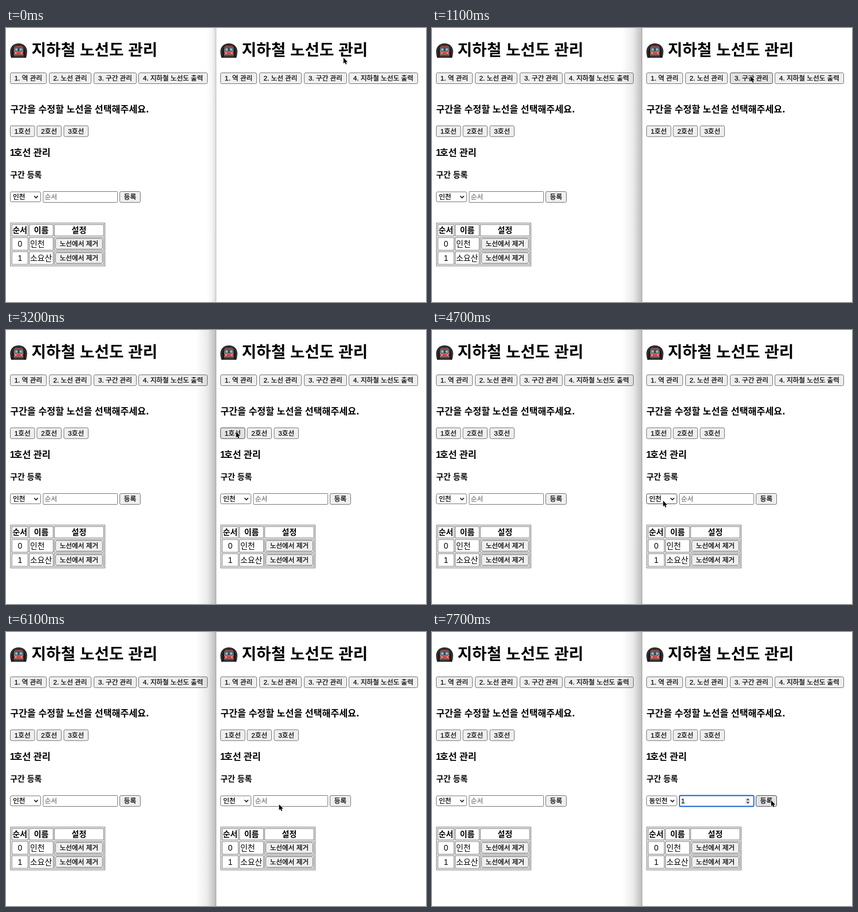
An HTML page for the animation above (8000 ms loop, 733 by 480 pixels).

```html
<!DOCTYPE html>
<html lang="ko">
<head>
<meta charset="utf-8">
<title>지하철 노선도 관리</title>
<style>
  html, body { margin: 0; width: 100%; height: 100%; overflow: hidden; background: #fff; }
  svg { display: block; width: 733px; height: 480px; }
  text { font-family: "Noto Sans CJK KR", "Noto Sans CJK", sans-serif; white-space: pre; }
  .ui, .digit { font-family: "Liberation Sans", "Noto Sans CJK KR", "Noto Sans CJK", sans-serif; }
  .ui { font-size: 11.65px; }
  .ui, .item { fill: currentColor; stroke: currentColor; stroke-width: .25px; }
  .bold { font-weight: 700; }
  .h1 { font-size: 27.75px; }
  .h3 { font-size: 16.2px; }
  .cell { font-size: 13.9px; }
  .item { font-size: 11.1px; }
  .line { fill: none; stroke: #757575; }
</style>
</head>
<body>
<svg id="stage" viewBox="0 0 733 480" xmlns="http://www.w3.org/2000/svg"></svg>
<script>
const LOOP = 8000, STEP = 100, SPLIT = 367;

const label = (x, y, s, cls, extra = '') => `<text x="${x}" y="${y}" class="${cls}" ${extra}>${s}</text>`;
const box = (x, y, w, h, extra) => `<rect x="${x}" y="${y}" width="${w}" height="${h}" ${extra}/>`;
const middle = 'text-anchor="middle"';

function button(x, y, w, h, s, name = '') {
  const id = name && `id="${name}"`;
  return box(x, y, w, h, `rx="2.4" fill="#efefef" stroke="#767676" ${id}`) +
    label(x + w / 2, y + h / 2 + 3.8, s, 'ui', middle);
}

function train() {
  return `<path d="M9 52.3Q7.2 47 7.2 41.5C7.2 32.5 13.5 27 22 27S36.8 32.5 36.8 41.5Q36.8 47 35 52.3Z" fill="#1d1d1f"/>
    <path d="M9.3 48.5C7.5 36 13 28.8 22 28.8S36.5 36 34.7 48.5" fill="none" stroke="#4c4c4f" stroke-width=".9"/>
    <path d="M12 52L15 47H29L32 52Z" fill="#34302f"/>
    <path d="M14 47V36Q14 31.6 18 31.2H26Q30 31.6 30 36V47Q30 48.5 28.5 48.5H15.5Q14 48.5 14 47Z" fill="#a8a5a5"/>
    <path d="M14 37Q14 31.6 18 31.2H26Q30 31.6 30 37L28.8 34.4H15.2Z" fill="#8f4441"/>
    <rect x="15" y="34.6" width="14" height="6.4" rx="1" fill="#2f4049"/>
    <path d="M16 35.6H20.4V40H16ZM23.6 35.6H28V40H23.6Z" fill="#8fb3c2"/>
    <path d="M14 42H30V46H14Z" fill="#d8423e"/>
    <circle cx="17" cy="44" r="1.1" fill="#ffeec0"/><circle cx="27" cy="44" r="1.1" fill="#ffeec0"/>
    <path d="M15 46.5H29V49H15Z" fill="#505053"/>`;
}

function header(p) {
  return train() + label(44.6, 48, '지하철 노선도 관리', 'h1 bold') +
    button(7.5, 78.5, 63, 19, '1. 역 관리') +
    button(75.5, 78.5, 73, 19, '2. 노선 관리') +
    button(153.5, 78.5, 74, 19, '3. 구간 관리', p + 'Section') +
    button(231.5, 78.5, 120, 19, '4. 지하철 노선도 출력');
}

function lines(p) {
  return label(7.2, 148.2, '구간을 수정할 노선을 선택해주세요.', 'h3 bold') +
    button(7.5, 171.3, 42.5, 19, '1호선', p + 'Line') +
    button(54, 171.3, 42.5, 19, '2호선') +
    button(101, 171.3, 42.5, 19, '3호선');
}

function table() {
  const cols = [[10.2, 28.2], [40.6, 41.8], [84.4, 86]];
  const rows = [[344.3, 20], [367, 22.3], [391.8, 22.3]];
  let out = box(7.8, 341.8, 164.8, 75, 'class="line"');
  for (const [y, h] of rows) for (const [x, w] of cols) out += box(x, y, w, h, 'class="line"');
  ['순서', '이름', '설정'].forEach((s, i) =>
    out += label(cols[i][0] + cols[i][1] / 2, 359.4, s, 'cell bold', middle));
  ['인천', '소요산'].forEach((s, i) => {
    const y = 383.2 + i * 24.8;
    out += label(24.4, y, i, 'cell digit', middle) + label(42, y, s, 'cell') +
      button(86.4, 368.8 + i * 24.8, 82, 18.6, '노선에서 제거');
  });
  return out;
}

function form(p) {
  return label(6.7, 223.7, '1', 'h3 bold digit') + label(13.5, 223.7, '호선 관리', 'h3 bold') +
    label(7.2, 261.5, '구간 등록', 'cell bold') +
    box(7.5, 287, 53, 17.5, `rx="2.4" fill="#fff" stroke="#767676" id="${p}Select"`) +
    label(12, 300.1, '인천', 'ui', `id="${p}Station"`) +
    '<path d="M49.3 294.2L52.5 297.6L55.7 294.2" fill="none" stroke="#111" stroke-width="1.6"/>' +
    box(64.9, 286.5, 129.8, 19, `rx="1" fill="#fff" stroke="#767676" id="${p}Input"`) +
    label(67.7, 300.1, '순서', 'ui', `id="${p}Order" color="#757575"`) +
    `<g id="${p}Spin" display="none">${box(179.5, 289.5, 9.5, 13.5, 'rx="1" fill="#ececec"')}
      <path d="M181.3 294.8L184.2 291.4L187.1 294.8ZM181.3 297.6L184.2 301L187.1 297.6Z" fill="#444"/></g>` +
    button(198.5, 286.5, 36, 19, '등록', p + 'Add') + table();
}

const stations = ['인천', '동인천', '도원', '소요산', '사당', '시청', '신도림', '대화', '오금', '오이도'];

function menu() {
  return box(368, 284, 61.5, 220, 'rx="5" fill="#e3e4e6" stroke="#bcbdbf" stroke-width=".7" filter="url(#soft)"') +
    box(372.5, 0, 53, 19, 'rx="3.6" fill="#4290f8" id="mark"') +
    '<path id="check" d="M376.2 297L378.4 299.8L382.6 292.8" fill="none" stroke-width="1.4"/>' +
    stations.map((s, i) => label(386, 300.6 + i * 19.2, s, 'item', `id="item${i}"`)).join('');
}

const shade = (id, from, a, b) => `<linearGradient id="${id}" gradientUnits="userSpaceOnUse" x1="${from}" x2="${SPLIT}" y1="0" y2="0">
  <stop offset="0" stop-opacity="0"/><stop offset=".55" stop-opacity="${a}"/><stop offset="1" stop-opacity="${b}"/></linearGradient>`;

document.getElementById('stage').innerHTML = `
  <defs>${shade('dim', 350, .04, .15)}${shade('deep', 332, .08, .27)}
    <filter id="soft" x="-20%" y="-10%" width="140%" height="120%">
      <feDropShadow dx="0" dy="1.5" stdDeviation="2.2" flood-opacity=".32"/></filter></defs>
  ${box(0, 0, 733, 480, 'fill="#fff"')}
  ${header('l')}${lines('l')}${form('l')}
  ${box(325, 0, SPLIT - 325, 480, 'id="shadow"')}
  ${box(SPLIT, 0, 366, 480, 'fill="#fff"')}
  ${box(SPLIT - 1, 0, 1, 480, 'fill-opacity=".13"')}
  <g transform="translate(${SPLIT})">${header('r')}
    <g id="lines">${lines('r')}</g><g id="form">${form('r')}</g></g>
  <g id="menu">${menu()}</g>
  <path id="cursor" d="M0 0V10.2L2.3 8.1L3.9 11.7L5.7 10.9L4.1 7.4H7.3Z" fill="#000" stroke="#fff" stroke-width="1.3" paint-order="stroke"/>`;

const el = id => document.getElementById(id);
const set = (id, attrs) => { for (const k in attrs) el(id).setAttribute(k, attrs[k]); };
const show = (id, on) => set(id, { display: on ? 'inline' : 'none' });

// time, x, y of the pointer tip
const path = [
  [0, 589, 52], [300, 559, 83], [500, 559, 83], [800, 555.8, 84],
  [1400, 555.8, 84], [2200, 401.5, 178.3], [3500, 401.5, 178.3], [4400, 403, 274],
  [4700, 403.3, 299], [5100, 403.3, 299], [5400, 406.5, 307], [5700, 407, 309],
  [6000, 466, 303], [6100, 476.5, 302], [6500, 476.5, 302], [7200, 591, 296],
  [7300, 591, 296], [7700, 592, 295]
];

function pointer(t) {
  const i = path.findIndex(k => k[0] > t);
  if (i < 0) return path[path.length - 1].slice(1);
  const [t0, x0, y0] = path[i - 1], [t1, x1, y1] = path[i];
  const u = (t - t0) / (t1 - t0), e = u * u * (3 - 2 * u);
  return [x0 + (x1 - x0) * e, y0 + (y1 - y0) * e];
}

function inside(id, x, y) {
  const b = el(id).getBBox();
  return x - SPLIT > b.x && x - SPLIT < b.x + b.width && y > b.y && y < b.y + b.height;
}

function paint(id, on, pressed) {
  set(id, {
    fill: pressed ? '#f5f5f5' : on ? '#e2e2e2' : '#efefef',
    stroke: pressed ? '#8d8d8d' : on ? '#4f4f4f' : '#767676'
  });
}

function render(ms) {
  const t = Math.floor(ms / STEP) * STEP;
  const [x, y] = pointer(t);
  const active = t >= 600, open = t >= 5000 && t < 6100;
  const focus = t >= 6300, typed = t >= 6500;

  set('cursor', { transform: `translate(${x} ${y})` });
  set('shadow', { fill: active ? 'url(#deep)' : 'url(#dim)' });
  show('lines', t >= 1100);
  show('form', t >= 3200);

  paint('rSection', active && inside('rSection', x, y), t === 1000);
  paint('rLine', t >= 1100 && inside('rLine', x, y), t === 3100);
  paint('rAdd', t >= 3200 && inside('rAdd', x, y), false);
  set('rSelect', { stroke: t >= 3200 && !open && inside('rSelect', x, y) ? '#4f4f4f' : '#767676' });

  el('rStation').textContent = stations[t >= 6200 ? 1 : 0];
  set('rInput', { stroke: focus ? '#1462cf' : '#767676', 'stroke-width': focus ? 1.8 : 1, rx: focus ? 2 : 1 });
  el('rOrder').textContent = typed ? '1' : '순서';
  set('rOrder', { color: typed ? '#000' : '#757575' });
  show('rSpin', focus);

  show('menu', open);
  set('menu', { opacity: t < 5800 ? 1 : Math.max(0, (6100 - t) / 400) });
  const row = t < 5300 ? 0 : 1;
  set('mark', { y: 287.3 + row * 19.2 });
  set('check', { stroke: row ? '#111' : '#fff' });
  stations.forEach((s, i) => set('item' + i, { color: i === row ? '#fff' : '#111' }));
}

const start = performance.now();
function tick() {
  render((performance.now() - start) % LOOP);
  requestAnimationFrame(tick);
}
tick();
</script>
</body>
</html>
```
